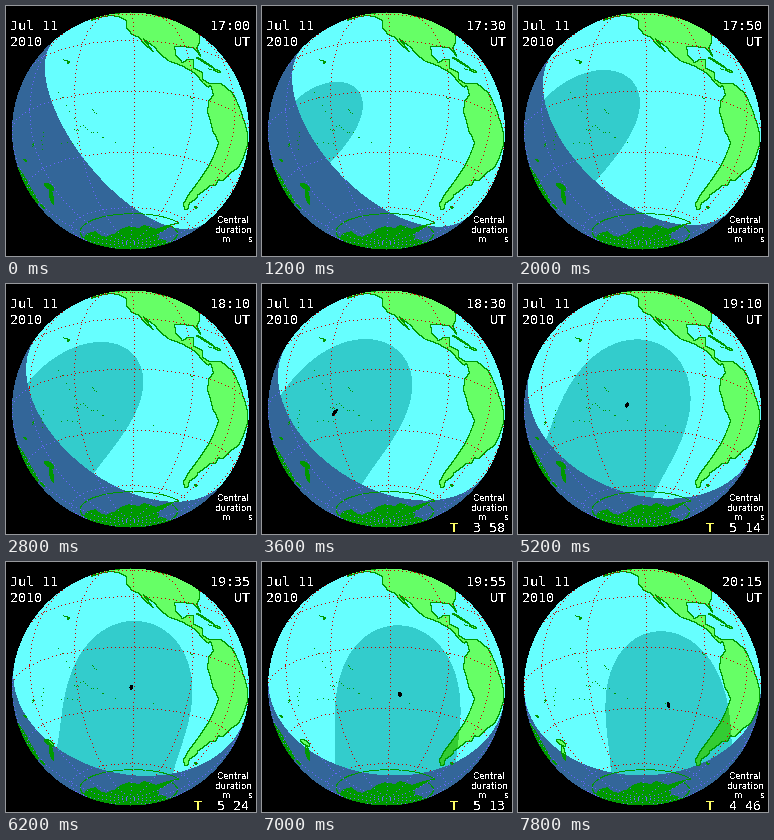
Write a matplotlib script that moves like this. It is 250 px wide and 250 px high and loops after 8 s.

```python
import matplotlib.pyplot as plt
import numpy as np
from matplotlib.animation import FuncAnimation
from matplotlib.path import Path

SIZE, FRAMES, STEP_MS = 250, 40, 200
CX, CY, R = 124.0, 124.5, 118.5
LAT0, LON0 = np.radians(-19.7), np.radians(-121.9)
DECL = np.radians(22.07)
GREATEST = 19.5586            # hours UT

OCEAN, SHADE, NIGHT = (102, 255, 255), (51, 204, 204), (51, 102, 153)
LAND, LAND_SHADE, LAND_NIGHT = (102, 255, 102), (51, 204, 51), (0, 153, 0)
COAST = (0, 153, 0)
GRID, GRID_NIGHT = (204, 0, 0), (102, 102, 255)

# Key points of the coasts as (longitude, latitude)
AMERICA = [
    (-165, 61), (-158, 56), (-151, 60), (-140, 59.7), (-130.3, 54.5),
    (-124.5, 48.5), (-124.4, 40.5), (-120.6, 34.5), (-117.2, 32.8),
    (-114.5, 28), (-110, 22.9), (-114.7, 31.5), (-109.4, 26.5),
    (-105.5, 21), (-102, 17.9), (-95, 16.1), (-87.5, 13), (-83.5, 8.6),
    (-80.5, 7.3), (-78.8, 8.8), (-77.3, 4), (-80.5, 0), (-81.2, -5.5),
    (-76.2, -14), (-70.3, -18.4), (-71.5, -30), (-73.6, -38), (-75.5, -48),
    (-74, -53), (-68, -55.7), (-65.2, -54.7), (-69, -51.5), (-66, -47.5),
    (-67.3, -46), (-64, -42), (-62.2, -39), (-57, -37.5), (-58, -34.5),
    (-53.5, -33.8), (-48, -27), (-41, -22), (-39, -15), (-35, -7),
    (-50, 0), (-61, 9.5), (-71, 12), (-75.5, 10.8), (-79.6, 9.6),
    (-83.5, 10.5), (-83.3, 15), (-88.5, 16), (-87, 21.4), (-90.4, 21),
    (-94.5, 18.2), (-97.6, 22.5), (-97, 28), (-90, 29.3), (-84, 30),
    (-81, 25.2), (-81.2, 31), (-76, 36), (-67, 45), (-56, 51), (-65, 60),
    (-100, 70), (-165, 68)]
ANTARCTICA = [
    (-57, -63.3), (-66, -67.5), (-75, -73), (-101, -72), (-104, -75),
    (-125, -73.7), (-150, -77), (-160, -78.3), (-194, -77.8), (-197, -75),
    (-190, -71.3), (-210, -68.5), (-230, -66.2), (-275, -67),
    (-315, -67.5), (-370, -71), (-395, -77), (-421, -75), (-422, -67)]
AUSTRALIA = [
    (-215, -18), (-207, -25), (-207, -30), (-210, -37.5), (-214, -38.8),
    (-221, -37), (-230, -32)]

# Long islands: longitude, latitude, half length, half width, tilt
ISLES = [
    (-79.3, 21.7, 5.3, .5, -20), (-71.5, 18.9, 2.8, .7, 0),
    (-184, -39, 3.2, 1.5, -45), (-189.5, -43.8, 4.6, 1.2, 40),
    (-213.5, -42, 1.5, 1.4, 0), (-194.5, -21.3, 1.8, .3, -38),
    (-59.5, -51.7, 1.4, .4, 0), (-155.6, 19.6, .6, .6, 0)]
# Chains of islets: both ends, number, scatter in degrees
CHAINS = [
    (-148, -15, -136, -22, 9, 1.0), (-140.5, -8, -138.8, -10.5, 4, .2),
    (-159.8, -21, -151, -23, 4, .5), (-159.5, 22, -156.3, 20.7, 6, .1),
    (-175, -21, -171.5, -14, 5, .3), (-159.5, 4, -151, -11, 5, .5),
    (-182.3, -18, -180, -16.6, 6, .2), (-91.2, -.5, -90.3, -.7, 4, .2),
    (-151.5, -16.7, -149.3, -17.7, 3, .1), (-78.2, 18.2, -76.3, 18, 4, 0),
    (-130, -25, -109.4, -27.1, 2, 0)]


def project(lon, lat):
    """Orthographic screen position and depth towards the viewer."""
    lam, phi = np.radians(lon) - LON0, np.radians(lat)
    across = np.cos(phi) * np.sin(lam)
    toward = np.cos(phi) * np.cos(lam)
    up = np.cos(LAT0) * np.sin(phi) - np.sin(LAT0) * toward
    depth = np.sin(LAT0) * np.sin(phi) + np.cos(LAT0) * toward
    return CX + R * across, CY - R * up, depth


def mark(mask, lon, lat, gap=0):
    """Set the visible pixels of a line, as dots if a gap is given."""
    x, y, depth = project(lon, lat)
    keep = depth > 0
    if gap:
        run = np.cumsum(np.hypot(np.diff(x, prepend=x[0]),
                                 np.diff(y, prepend=y[0])))
        keep &= np.diff(run // gap, prepend=-1) > 0
    mask[np.rint(y[keep]).astype(int), np.rint(x[keep]).astype(int)] = True


def trace(mask, ring):
    for a, b in zip(ring, np.roll(ring, -1, axis=0)):
        k = np.linspace(0, 1, 300)[:, None]
        mark(mask, *(a + (b - a) * k).T)


def ellipse(lon, lat, length, width, tilt):
    a, turn = np.linspace(0, 2 * np.pi, 16, endpoint=False), np.radians(tilt)
    p, q = length * np.cos(a), width * np.sin(a)
    east = p * np.cos(turn) - q * np.sin(turn)
    north = p * np.sin(turn) + q * np.cos(turn)
    return np.column_stack([lon + east / np.cos(np.radians(lat)), lat + north])


def polar(lon, lat):
    r, a = 90 + lat, np.radians(lon)
    return np.column_stack([r * np.cos(a), r * np.sin(a)])


# Latitude and longitude under every pixel
row, col = np.mgrid[0:SIZE, 0:SIZE]
u, v = (col - CX) / R, (CY - row) / R
globe = u**2 + v**2 <= 1
w = np.sqrt(np.clip(1 - u**2 - v**2, 0, 1))
sin_lat = np.clip(v * np.cos(LAT0) + w * np.sin(LAT0), -1, 1)
lat = np.arcsin(sin_lat)
lon = LON0 + np.arctan2(u, w * np.cos(LAT0) - v * np.sin(LAT0))
flat_lat = np.degrees(lat).ravel()
flat_lon = (np.degrees(lon).ravel() + 270) % 360 - 270

rings = [np.array(r, float) for r in (AMERICA, AUSTRALIA)]
rings += [ellipse(*isle) for isle in ISLES]
ice = np.array(ANTARCTICA, float)
land = Path(polar(*ice.T)).contains_points(polar(flat_lon, flat_lat))
for ring in rings:
    land |= Path(ring).contains_points(np.column_stack([flat_lon, flat_lat]))
land = land.reshape(SIZE, SIZE) & globe

coast = np.zeros((SIZE, SIZE), bool)
for ring in rings + [ice]:
    trace(coast, ring)
rng = np.random.default_rng(7)
for lon_a, lat_a, lon_b, lat_b, count, scatter in CHAINS:
    spread = rng.normal(0, scatter, (2, count))
    mark(coast, np.linspace(lon_a, lon_b, count) + spread[0],
         np.linspace(lat_a, lat_b, count) + spread[1])
coast &= globe

grid = np.zeros((SIZE, SIZE), bool)
turn, rise = np.arange(-180, 180, .1), np.arange(-90, 90, .1)
for deg in range(-60, 61, 30):
    mark(grid, turn, np.full(turn.shape, deg), gap=4)
for deg in range(-180, 180, 30):
    mark(grid, np.full(rise.shape, deg), rise, gap=4)
grid &= globe


def render(ut):
    """Map with daylight, penumbra and umbra at a given hour."""
    hour = lon - np.radians(-15 * (ut - 12.09))
    xi = np.cos(lat) * np.sin(hour)
    eta = sin_lat * np.cos(DECL) - np.cos(lat) * np.sin(DECL) * np.cos(hour)
    zeta = sin_lat * np.sin(DECL) + np.cos(lat) * np.cos(DECL) * np.cos(hour)
    t = ut - GREATEST
    axis_gap = np.hypot(xi - (-.161 + .562 * t), eta - (-.661 - .1353 * t))
    day = zeta > 0
    shade = day & (axis_gap < .536 - .0046 * zeta)
    umbra = day & (axis_gap < .0132 + .0046 * zeta)

    img = np.zeros((SIZE, SIZE, 3), np.uint8)

    def paint(area, lit, dim, dark):
        img[area & day] = lit
        img[area & shade] = dim
        img[area & ~day] = dark

    paint(globe, OCEAN, SHADE, NIGHT)
    paint(land, LAND, LAND_SHADE, LAND_NIGHT)
    img[coast] = COAST
    paint(grid, GRID, GRID, GRID_NIGHT)
    img[globe & umbra] = 0
    return img


plt.rcParams["text.antialiased"] = False
fig = plt.figure(figsize=(2.5, 2.5), dpi=100, facecolor="black")
ax = fig.add_axes([0, 0, 1, 1])
ax.axis("off")
picture = ax.imshow(render(17), interpolation="nearest", aspect="auto")


def label(x, y, text, px=13.3, font="DejaVu Sans Mono", color="white"):
    return fig.text(x / SIZE, 1 - y / SIZE, text, fontsize=px * .72,
                    family=font, color=color, ha="left", va="baseline")


def small(x, y, text):
    label(x, y, text, 8.8, "DejaVu Sans")


label(4, 24, "Jul 11")
label(4, 40, "2010")
label(228, 40, "UT")
small(211, 217, "Central")
small(210, 227, "duration")
small(216, 236, "m")
small(242, 236, "s")
clock = label(204, 24, "")
kind = label(188, 248, "", color="#ffff66")
length = label(211, 248, "")

# Length of totality in seconds, by minutes after 18:30
totality = np.polyfit([0, 40, 65, 105], [238, 314, 324, 286], 3)


def update(i):
    minutes = 17 * 60 + 5 * i
    picture.set_data(render(minutes / 60))
    clock.set_text(f"{minutes // 60}:{minutes % 60:02d}")
    central = minutes >= 18 * 60 + 20
    secs = int(round(np.polyval(totality, minutes - 1110)))
    kind.set_text("T" if central else "")
    length.set_text(f"{secs // 60} {secs % 60:2d}" if central else "")
    return picture, clock, kind, length


anim = FuncAnimation(fig, update, frames=FRAMES, interval=STEP_MS,
                     repeat=True, repeat_delay=0, blit=False)
plt.show()
```
